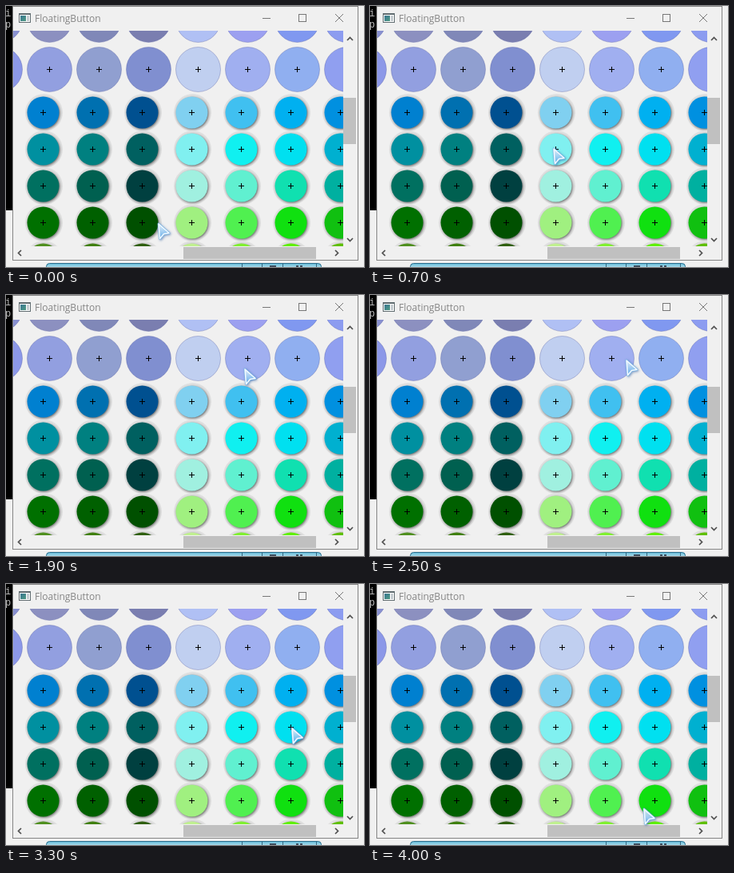
An HTML page with a canvas that plays this animation: 448 by 327 pixels, repeating every 4200 ms.

```html
<!DOCTYPE html>
<html lang="en">
<head>
<meta charset="utf-8">
<title>FloatingButton</title>
<style>
  html, body { margin: 0; width: 100%; height: 100%; overflow: hidden; background: #f0f0f0; }
  canvas { display: block; }
</style>
</head>
<body>
<canvas id="stage" width="448" height="327"></canvas>
<script>
const W = 448, H = 327, LOOP = 4200, STEP = 100;
const stage = document.getElementById('stage').getContext('2d');
const sheet = document.createElement('canvas');
sheet.width = W;
sheet.height = H;
const c = sheet.getContext('2d');

// One row per line of buttons, colours from left to right.
const bigRows = [
  [17, '#8890d0 #8c90c0 #8088b8 #7a7eb0 #b0c0f4 #9ca0f0 #8098f0 #8c9cf0'],
  [79, '#8c98e8 #929fe0 #909fd0 #808fd0 #c0cff0 #a0aff0 #90aff0 #909ff0']
];
const smallRows = [
  '#0080d0 #0070b0 #005090 #80d0f0 #40c0f0 #00b0f0 #0090e0',
  '#0090a0 #008080 #006060 #80f0f0 #10f0f0 #00e0f0 #00b0d0',
  '#007060 #006050 #004040 #a0f0e0 #60f0d0 #10e0b0 #00b0a0',
  '#007000 #006000 #005000 #a0f080 #50f050 #10e010 #10c010',
  '#509020 #408010 #306010 #c0f090 #80f030 #60f000 #60c000'
];

// Pointer moves: start time, number of steps, x and y reached.
const home = [190, 272];
const moves = [
  [100, 5, 230, 192], [700, 1, 229, 178],
  [1100, 2, 286, 178], [1300, 3, 295, 146],
  [1900, 1, 298, 92], [2000, 2, 300, 79],
  [2500, 3, 361, 84],
  [3100, 1, 359, 142], [3200, 2, 357, 180],
  [3600, 2, 353, 272], [3800, 3, 342, 281]
];

function rect(x, y, w, h, color) {
  c.fillStyle = color;
  c.fillRect(x, y, w, h);
}

function disc(x, y, r, color) {
  c.fillStyle = color;
  c.beginPath();
  c.arc(x, y, r, 0, Math.PI * 2);
  c.fill();
}

function line(points, color, width) {
  c.strokeStyle = color;
  c.lineWidth = width;
  c.beginPath();
  points.forEach(([x, y]) => c.lineTo(x, y));
  c.stroke();
}

function text(str, x, y, font, color) {
  c.font = font;
  c.fillStyle = color;
  c.fillText(str, x, y);
}

function plus(x, y) {
  rect(x - 3, y, 7, 1, '#000');
  rect(x, y - 3, 1, 7, '#000');
}

function bigButton(x, y, color) {
  disc(x + .5, y + .5, 28, color);
  c.strokeStyle = 'rgba(60,70,150,.3)';
  c.lineWidth = 1;
  c.stroke();
  plus(x, y);
}

function smallButton(x, y, color) {
  disc(x + 1.5, y + .5, 23.5, '#e1e1e1');
  c.save();
  c.shadowColor = 'rgba(0,0,0,.55)';
  c.shadowBlur = 3;
  c.shadowOffsetX = c.shadowOffsetY = 1;
  disc(x + .5, y + .5, 20, color);
  c.restore();
  plus(x, y);
}

function drawButtons() {
  c.save();
  c.beginPath();
  c.rect(9, 31, 413, 270);
  c.clip();
  bigRows.forEach(([y, colors]) =>
    colors.split(' ').forEach((color, i) => bigButton(62 * i - 8, y, color)));
  smallRows.forEach((colors, row) =>
    colors.split(' ').forEach((color, i) => smallButton(46 + 62 * i, 133 + 46 * row, color)));
  c.restore();
}

function chevron(x, y, turn) {
  c.save();
  c.translate(x, y);
  c.rotate(turn * Math.PI / 2);
  line([[-3.5, 2], [0, -1.5], [3.5, 2]], '#505050', 1.7);
  c.restore();
}

function drawBars() {
  rect(422, 115, 16, 58, '#c0c0c0');
  rect(222, 302, 166, 15, '#c0c0c0');
  chevron(430.5, 41, 0);
  chevron(430.5, 293, 2);
  chevron(17, 309.5, 3);
  chevron(414, 309.5, 1);
}

function drawTitle() {
  rect(16, 9, 15, 12, '#606c70');
  rect(17, 11, 13, 9, '#fff');
  const shade = c.createLinearGradient(18, 12, 25, 19);
  shade.addColorStop(0, '#3c7894');
  shade.addColorStop(1, '#4c9880');
  rect(18, 12, 7, 7, shade);
  rect(26, 12, 3, 7, '#c4ccd0');
  text('FloatingButton', 36, 20, '12px "Open Sans", "Noto Sans", sans-serif', '#858585');
  rect(321, 15, 10, 1, '#777');
  c.strokeStyle = '#777';
  c.lineWidth = 1;
  c.strokeRect(366.5, 10.5, 9, 9);
  line([[412, 10], [422, 20]], '#777', 1);
  line([[422, 10], [412, 20]], '#777', 1);
}

function drawBackdrop() {
  rect(0, 0, W, H, '#f0f0f0');
  rect(0, 0, 8, 256, '#000');
  const mono = '12px "Liberation Mono", monospace';
  text('i', -1, 13, mono, '#c0c0c0');
  text('p', -1, 27, mono, '#c0c0c0');

  const glass = c.createLinearGradient(0, 322, 0, H);
  glass.addColorStop(0, '#58b4d4');
  glass.addColorStop(1, '#a8dcec');
  c.fillStyle = glass;
  c.strokeStyle = '#286c8c';
  c.lineWidth = 1;
  c.beginPath();
  c.roundRect(50.5, 322.5, 344, 12, 4);
  c.fill();
  c.stroke();
  [295, 320, 346, 388].forEach(x => rect(x, 323, 1, 4, '#386880'));
  rect(330, 325, 8, 2, '#405060');
  rect(363, 325, 3, 2, '#405060');
  rect(368, 325, 3, 2, '#405060');
}

function drawWindow() {
  rect(8, 0, 433, 319, '#f0f0f0');
  c.strokeStyle = '#858585';
  c.lineWidth = 1;
  c.strokeRect(8.5, .5, 432, 318);
}

function pointerAt(time) {
  let [x, y] = home;
  for (const [start, steps, toX, toY] of moves) {
    if (time < start) break;
    const done = Math.min(1, (Math.floor((time - start) / STEP) + 1) / steps);
    x += (toX - x) * done;
    y += (toY - y) * done;
  }
  return [Math.round(x), Math.round(y)];
}

function drawPointer(x, y) {
  const g = stage;
  g.save();
  g.translate(x, y);
  g.beginPath();
  [[1, 1], [14, 12.5], [7.5, 13.5], [2.5, 19.5]].forEach(([px, py]) => g.lineTo(px, py));
  g.closePath();
  g.lineJoin = 'round';
  g.shadowColor = 'rgba(40,90,160,.6)';
  g.shadowBlur = 3;
  g.shadowOffsetX = g.shadowOffsetY = 1;
  g.strokeStyle = '#78b4e4';
  g.lineWidth = 2.8;
  g.stroke();
  g.shadowColor = 'transparent';
  const fill = g.createLinearGradient(3, 3, 6, 18);
  fill.addColorStop(0, 'rgba(225,240,252,.9)');
  fill.addColorStop(1, 'rgba(100,175,235,.9)');
  g.fillStyle = fill;
  g.fill();
  g.strokeStyle = '#f4faff';
  g.lineWidth = 1.5;
  g.stroke();
  g.restore();
}

drawBackdrop();
drawWindow();
drawButtons();
drawBars();
drawTitle();

const begin = performance.now();
function frame() {
  stage.drawImage(sheet, 0, 0);
  drawPointer(...pointerAt((performance.now() - begin) % LOOP));
  requestAnimationFrame(frame);
}
frame();
</script>
</body>
</html>
```
